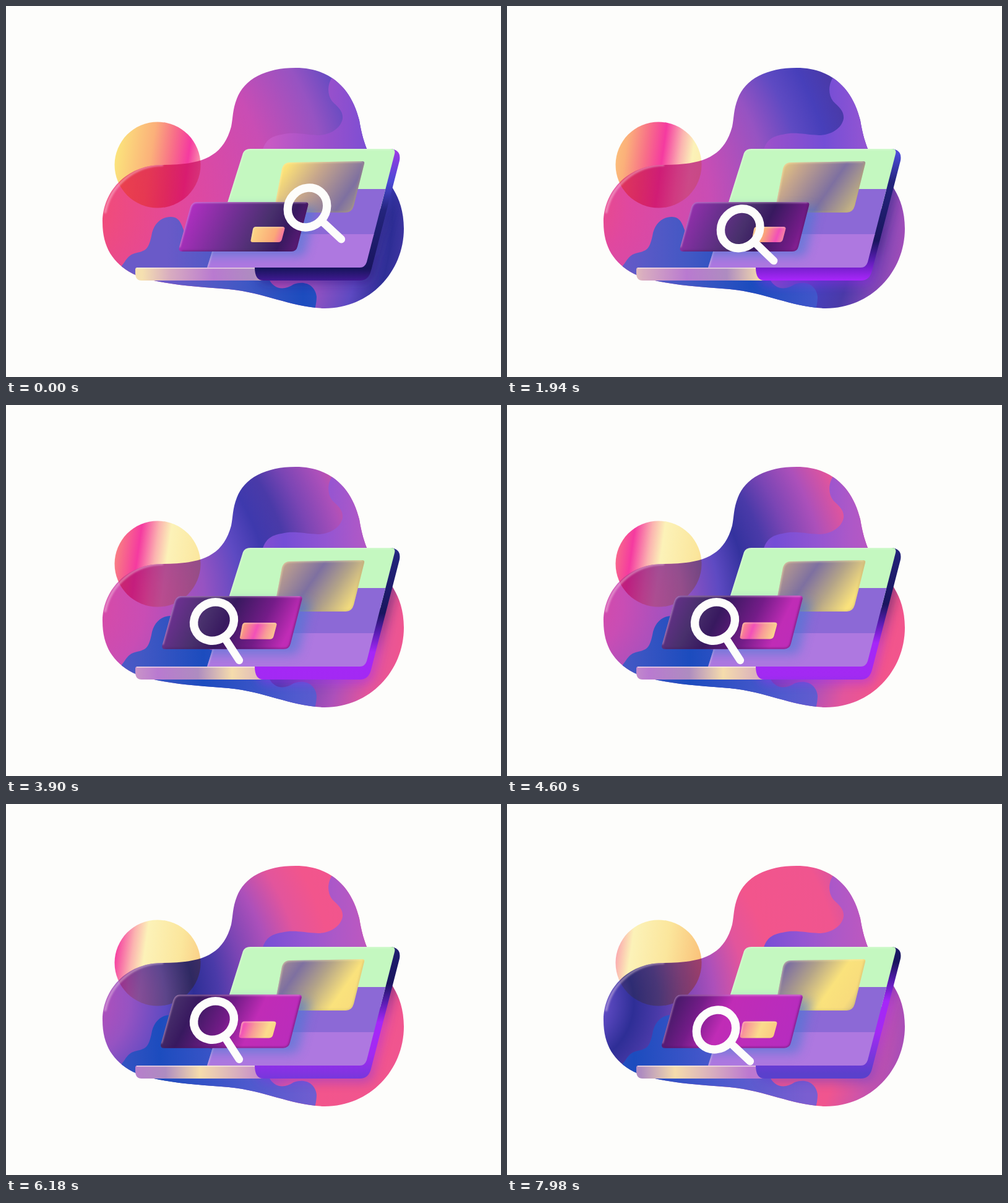
Recreate the animation shown at these times as an HTML page. Size 800 by 600 pixels, loop 8000 ms.

```html
<!DOCTYPE html>
<html lang="en">
<head>
<meta charset="utf-8">
<title>Laptop search</title>
<style>
html, body { margin: 0; width: 100%; height: 100%; overflow: hidden; background: #fdfdfb; }
svg { display: block; width: 100vw; height: 100vh; }
#scene { isolation: isolate; }
#overlap { mix-blend-mode: multiply; opacity: .8; }
</style>
</head>
<body>
<svg viewBox="0 0 800 600">
  <defs id="defs">
    <filter id="soft" x="-20%" y="-20%" width="140%" height="140%"><feGaussianBlur stdDeviation="1.5"/></filter>
    <filter id="shade" x="-30%" y="-30%" width="160%" height="160%"><feGaussianBlur stdDeviation="8"/></filter>
    <path id="blob" d="M156 350C156 300 195 258 250 257C310 257 350 248 364 195C367 180 366 168 373 150C385 118 420 100 468 100C530 100 560 140 571 185C574 203 577 215 583 231C597 272 643 290 643 360C643 430 588 489 515 489C460 487 420 464 360 458C310 454 240 450 205 433C173 416 156 390 156 350Z"/>
    <path id="screen" d="M395 231H622Q630 231 628 239L583 414Q580 423 572 423H325L383 238Q386 231 395 231Z"/>
    <path id="side" d="M622 231Q639 233 636 250L590 428Q586 444 572 444H416Q402 444 402 423H572Z"/>
    <path id="tile" d="M459 253L576 251Q580 251 579 255L562 323Q559 334 549 334H437Q432 334 434 326L446 263Q449 253 459 253Z"/>
    <path id="card" d="M308 317H483Q490 317 488 323L471 389Q469 397 461 397H284Q278 397 280 390L298 325Q301 317 308 317Z"/>
    <path id="chip" d="M404 357H446Q452 357 450 362L446 377Q445 382 440 382H399Q394 382 396 377L399 361Q400 357 404 357Z"/>
    <clipPath id="inBlob"><use href="#blob"/></clipPath>
    <clipPath id="inScreen"><use href="#screen"/></clipPath>
    <clipPath id="inTile"><use href="#tile"/></clipPath>
    <clipPath id="inCard"><use href="#card"/></clipPath>
    <clipPath id="inChip"><use href="#chip"/></clipPath>
  </defs>
  <g id="scene">
    <rect width="800" height="600" fill="#fdfdfb"/>
    <circle cx="245" cy="257" r="69.5" fill="url(#gSun)"/>
    <use href="#blob" fill="url(#gBlob)"/>
    <g clip-path="url(#inBlob)">
      <path fill="url(#gCrest)" d="M528 114C520 125 518 142 527 154C537 164 545 170 544 182C541 199 522 209 504 209C480 208 465 203 445 208C428 211 420 217 415 232L600 240V100Z"/>
      <path fill="url(#gWave)" d="M180 426C191 421 193 404 208 400C225 396 230 395 235 372C238 352 251 341 266 341C283 341 284 357 291 372C300 388 320 390 335 398V440H424C432 458 449 461 465 450C485 443 500 453 502 470Q502 480 498 495H180Z"/>
    </g>
    <circle id="overlap" cx="245" cy="257" r="69.5" fill="url(#gSun)" clip-path="url(#inBlob)"/>
    <g clip-path="url(#inBlob)">
      <path d="M160 335C169 288 210 257 254 257" fill="none" stroke="#ffe6f2" stroke-width="3.5" opacity=".45" filter="url(#soft)"/>
      <use href="#side" fill="url(#gSide)" transform="translate(5 7)" opacity=".45" filter="url(#shade)"/>
    </g>

    <path d="M212 423H420V444H219Q209 444 209 432V426Q209 423 212 423Z" fill="url(#gBase)"/>
    <path d="M211 424H402" stroke="#fff4f0" stroke-width="1.6" opacity=".7"/>
    <use href="#side" fill="url(#gSide)"/>
    <g clip-path="url(#inScreen)">
      <rect x="320" y="228" width="320" height="100" fill="#c4f8c0"/>
      <path d="M440 296H640V370H320V328H440Z" fill="#8c69d6"/>
      <rect x="320" y="369" width="320" height="56" fill="#ae78e0"/>
      <path d="M325 423L383 238Q386 231 395 231H622" fill="none" stroke="#f8fff0" stroke-width="2.5" opacity=".5" filter="url(#soft)"/>
    </g>
    <use href="#tile" fill="url(#gTile)"/>
    <g clip-path="url(#inTile)">
      <path d="M434 326L446 263Q449 253 459 253L576 251" fill="none" stroke="#fff4b8" stroke-width="3" opacity=".5" filter="url(#soft)"/>
      <path d="M579 253L562 323Q559 334 549 334H437" fill="none" stroke="#b8a672" stroke-width="3" opacity=".4" filter="url(#soft)"/>
    </g>
    <g clip-path="url(#inScreen)">
      <g class="lift"><use href="#card" transform="translate(13 8)" fill="#4a78d4" opacity=".6" filter="url(#shade)"/></g>
    </g>
    <g class="lift">
      <use href="#card" fill="url(#gCard)"/>
      <g clip-path="url(#inCard)">
        <path d="M280 390L298 325Q301 317 308 317H486" fill="none" stroke="#f0c4ea" stroke-width="2.6" opacity=".65" filter="url(#soft)"/>
        <path d="M488 320L471 389Q469 397 461 397H284" fill="none" stroke="#4a1558" stroke-width="3" opacity=".5" filter="url(#soft)"/>
      </g>
      <use href="#chip" fill="url(#gChip)"/>
      <g clip-path="url(#inChip)">
        <path d="M396 377L399 361Q400 357 404 357H450" fill="none" stroke="#ffecc0" stroke-width="2.4" opacity=".65" filter="url(#soft)"/>
      </g>
    </g>
    <g id="glass" fill="none" stroke="#fdfdfb">
      <ellipse rx="30.3" ry="33.3" stroke-width="13.4"/>
      <path d="M34 0H75" stroke-width="12.5" stroke-linecap="round"/>
    </g>
  </g>
</svg>
<script>
const LOOP = 8000;
const NS = 'http://www.w3.org/2000/svg';
const $ = id => document.getElementById(id);
const clamp = v => Math.max(0, Math.min(1, v));
const mix = (a, b, k) => a + (b - a) * k;
const set = (el, attrs) => { for (const k in attrs) el.setAttribute(k, attrs[k]); };

function gradient(kind, id, stops) {
  const el = document.createElementNS(NS, kind);
  set(el, { id, gradientUnits: 'userSpaceOnUse' });
  for (const [, color] of stops) {
    const s = document.createElementNS(NS, 'stop');
    set(s, { 'stop-color': color });
    el.appendChild(s);
  }
  $('defs').appendChild(el);
  return el;
}

// Linear gradient whose stops are pixel offsets from a travelling anchor.
function band(id, angle, stops) {
  const el = gradient('linearGradient', id, stops);
  const lo = stops[0][0], hi = stops[stops.length - 1][0];
  const c = Math.cos(angle * Math.PI / 180), d = Math.sin(angle * Math.PI / 180);
  stops.forEach(([at], i) => set(el.children[i], { offset: (at - lo) / (hi - lo) }));
  return (x, y) => set(el, { x1: x + lo * c, y1: y + lo * d, x2: x + hi * c, y2: y + hi * d });
}

// Rings around a fixed centre, all shrinking towards it.
function rings(id, cx, cy, r, stops) {
  const el = gradient('radialGradient', id, stops);
  set(el, { cx, cy, r });
  return {
    stops: el.children,
    move(p) { stops.forEach(([at], i) => set(el.children[i], { offset: clamp((p + at) / r) })); }
  };
}

const NAVY = 5;
const blob = rings('gBlob', 100, 320, 1000, [
  [-460, '#f04b7c'], [-330, '#e0489f'], [-200, '#c94db4'], [-104, '#9653c2'], [-45, '#5e4ac2'],
  [0, '#2f2f96'], [40, '#4a3aa8'], [80, '#7a45b4'], [130, '#ac50ba'], [180, '#e2559c'],
  [230, '#f2558c'], [340, '#f0558f'], [390, '#cc54aa'], [450, '#a04cba']]);
const crest = band('gCrest', 0, [
  [-180, '#c85ac4'], [-80, '#9650cc'], [0, '#744ed6'], [70, '#9455d2'], [120, '#ac58c8'], [220, '#cc58b8']]);
const wave = band('gWave', 0, [
  [-220, '#6a5ac8'], [-100, '#4258c4'], [0, '#1c4cbe'], [150, '#505ace'], [280, '#7a5ed0']]);
const sun = band('gSun', 8, [
  [-115, '#fbe27c'], [-60, '#fbb07a'], [-28, '#f87088'], [0, '#f53aa0'], [28, '#fbb4b0'],
  [48, '#fcf2b8'], [105, '#fbe69c'], [165, '#fac078']]);
const side = band('gSide', 90, [
  [-165, '#9a3ae4'], [-115, '#4a4ad4'], [-70, '#23247c'], [25, '#19155e'], [55, '#571cb0'],
  [88, '#a626f8'], [140, '#a22af2'], [205, '#5a40cc']]);
const base = band('gBase', 0, [
  [-235, '#f5e0b0'], [-190, '#d8acc0'], [-120, '#b97ad0'], [-55, '#ae8cc0'], [0, '#f5dcac'],
  [60, '#d8aebe'], [120, '#bc78d0']]);
const tile = band('gTile', 35, [
  [-105, '#fbe178'], [-58, '#c6a68c'], [0, '#7e70a0'], [38, '#b4a488'], [78, '#fae27c'],
  [112, '#f8dc7c'], [150, '#b8a684']]);
const card = band('gCard', 26, [
  [-160, '#b42ec4'], [-80, '#6c3090'], [-32, '#48306c'], [0, '#38195f'], [50, '#741c88'],
  [90, '#c02cb6'], [200, '#b62cc0']]);
const chip = band('gChip', 20, [
  [-55, '#fbd284'], [-22, '#fba878'], [0, '#f250b8'], [15, '#f89a98'], [35, '#fbdc8c'], [70, '#fac27c']]);

// time, x, y, angle
const keys = [
  [0, 487, 326, 43], [1100, 446, 365, 39], [2780, 332, 352, 52.5],
  [3400, 336, 350, 57], [7200, 336, 350, 57], [7980, 338, 365, 43]];

function slope(i, c) {
  const a = keys[i - 1], b = keys[i], d = keys[i + 1];
  if (!a || !d || (b[c] - a[c]) * (d[c] - b[c]) <= 0) return 0;
  return (d[c] - a[c]) / (d[0] - a[0]);
}

function along(ms, c) {
  let i = 0;
  while (i < keys.length - 2 && ms > keys[i + 1][0]) i++;
  const a = keys[i], b = keys[i + 1], h = b[0] - a[0], u = clamp((ms - a[0]) / h);
  return mix(a[c], b[c], u * u * (3 - 2 * u))
    + h * u * (1 - u) * ((1 - u) * slope(i, c) - u * slope(i + 1, c));
}

const easeInOut = u => u < .5 ? 4 * u ** 3 : 1 - 4 * (1 - u) ** 3;
const lifted = document.querySelectorAll('.lift');

function draw(ms) {
  const t = ms / 1000;
  blob.move(525 - 50 * t - .33 * t * t);
  const deep = clamp(Math.abs(t - 2.6) / 2.4);
  set(blob.stops[NAVY], {
    'stop-color': `rgb(${mix(80, 46, deep)},${mix(70, 46, deep)},${mix(200, 150, deep)})`
  });
  crest(605 - 55 * t + 3.8 * t * t, 160);
  wave(480 - 48 * t + 1.7 * t * t, 420);
  sun(293 - 24 * t + .75 * t * t, 257);
  side(0, 400 - 24 * t + .35 * t * t);
  base(455 - 23 * t, 433);
  tile(560 - 20 * t + .5 * t * t, 292);
  card(455 - 18 * t - .65 * t * t, 357);
  chip(458 - 11 * t + .28 * t * t, 369);

  const k = easeInOut(clamp((ms - 2800) / 1500));
  const pose = `translate(${mix(384, 364, k)} ${mix(357, 351.5, k)}) `
    + `scale(${mix(1, 1.09, k)} ${mix(1, 1.08, k)}) translate(-384 -357)`;
  for (const el of lifted) set(el, { transform: pose });
  set($('glass'), {
    transform: `translate(${along(ms, 1)} ${along(ms, 2)}) rotate(${along(ms, 3)})`
  });
}

const start = performance.now();
function tick() {
  draw((performance.now() - start) % LOOP);
  requestAnimationFrame(tick);
}
tick();
</script>
</body>
</html>
```
